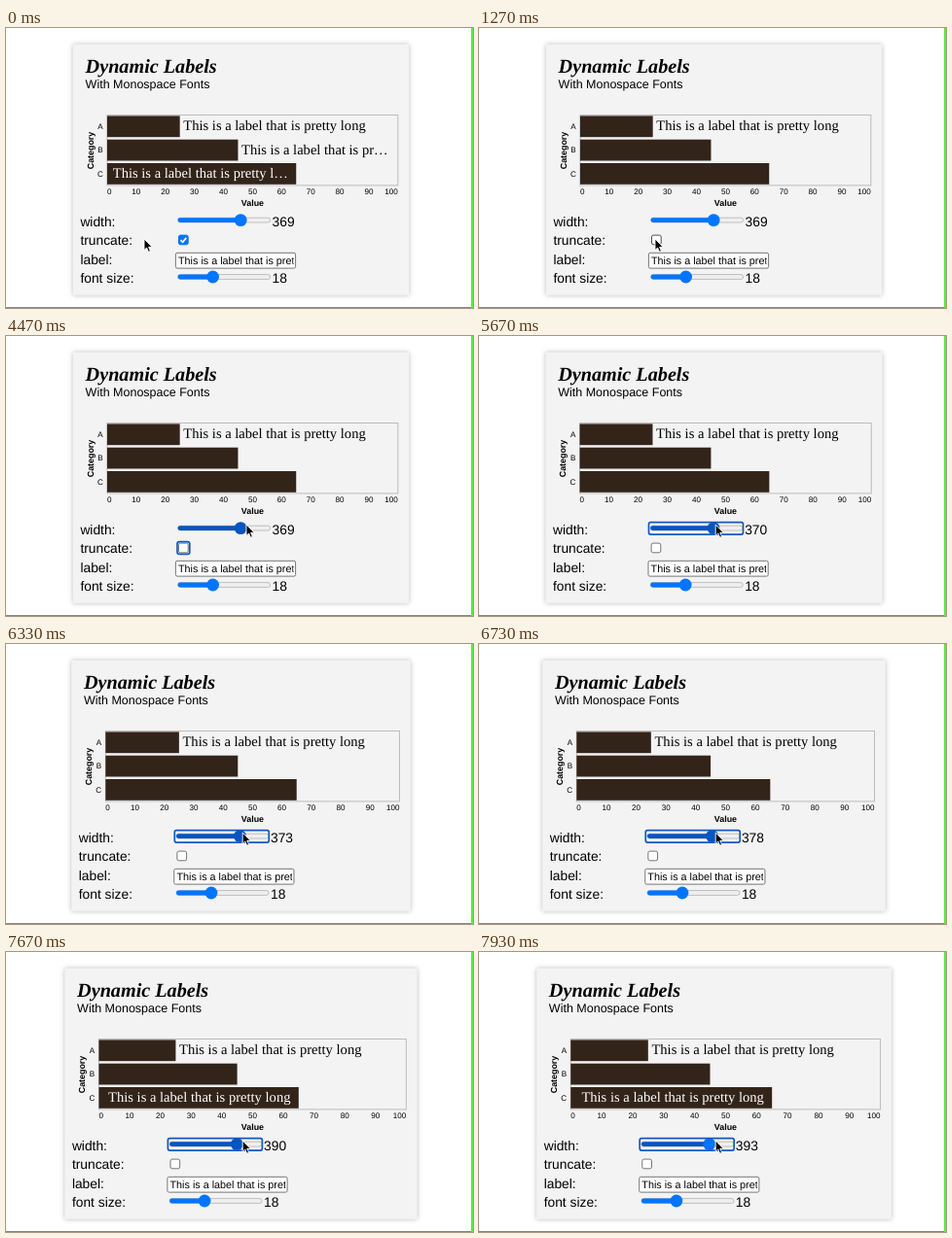
Write an HTML page that moves like this. It is 480 px wide and 288 px high and loops after 8000 ms.

```html
<!DOCTYPE html>
<html lang="en">
<head>
<meta charset="utf-8">
<title>Dynamic Labels</title>
<style>
  html, body { margin: 0; width: 100%; height: 100%; overflow: hidden; background: #fff; }
  svg { display: block; font-family: "Liberation Sans", Arial, sans-serif; text-rendering: geometricPrecision; }
  text { white-space: pre; }
  .serif { font-family: "Liberation Serif", Times, serif; }
  .title { font-size: 20.2px; font-weight: bold; font-style: italic; }
  .sub { font-size: 12.5px; }
  .form { font-size: 13.8px; }
  .tick { font-size: 8.1px; }
  .axis { font-size: 8.9px; font-weight: bold; text-anchor: middle; }
  .label { font-size: 14.58px; }
  .ring { fill: none; stroke: #1059c4; stroke-width: 1.7; }
  #card { fill: #f3f3f3; filter: drop-shadow(0 0 2.5px rgba(0, 0, 0, .27)); }
</style>
</head>
<body>
<svg id="stage" width="480" height="288" viewBox="0 0 480 288">
  <defs><clipPath id="field"><rect x="176" y="231" width="119.6" height="16"/></clipPath></defs>
  <rect id="card" y="16.8" height="258"/>
  <g id="left">
    <text class="serif title" x="81.6" y="46.4">Dynamic Labels</text>
    <text class="sub" x="81.6" y="62.4">With Monospace Fonts</text>
    <text class="axis" transform="translate(89.6 126) rotate(-90)">Category</text>
    <g class="form">
      <text x="76.4" y="204">width:</text>
      <text x="76.4" y="223.2">truncate:</text>
      <text x="76.4" y="243">label:</text>
      <text x="76.4" y="262">font size:</text>
      <text id="value" x="273.6" y="203.8">369</text>
      <text x="273.6" y="262">18</text>
    </g>
    <g id="sliders"></g>
    <rect id="sliderRing" class="ring" x="174.9" y="191.7" width="97" height="12.4" rx="2"/>
    <rect id="box" x="177.5" y="213.1" width="9.7" height="9.7" rx="1.8"/>
    <path id="check" d="M179.5 218.1l2.1 2.2 3.8-4.6" fill="none" stroke="#fff" stroke-width="1.7"/>
    <rect id="boxRing" class="ring" x="176" y="211.6" width="12.8" height="12.8" rx="2.2"/>
    <rect x="174.4" y="231.3" width="123.2" height="15.8" rx="1.6" fill="#fff" stroke="#767676"/>
    <text x="177" y="242.9" font-size="10.8" clip-path="url(#field)">This is a label that is pretty long</text>
  </g>
  <g id="chart"></g>
  <text class="axis" x="253.4" y="183">Value</text>
  <rect x="478" width="2" height="288" fill="#55ee3c"/>
  <rect y="287" width="478" height="1" fill="#848484"/>
  <path id="cursor" d="M0 0V11.4L2.6 9 4.4 13.2 6.4 12.4 4.6 8.3H8.2Z" stroke="#fff" stroke-width=".9"/>
</svg>
<script>
const LOOP = 8000, FPS = .015, SCALE = .81, MID = 253.4, CHAR = 7.2;
const LABEL = "This is a label that is pretty long";
const BLUE = "#0075ff", DARK = "#0555c0", PRESSED = "#3b93ff";
const $ = id => document.getElementById(id);

function set(node, attrs) {
  for (const k in attrs) node.setAttribute(k, attrs[k]);
  return node;
}
function add(parent, tag, attrs, text = "") {
  const node = document.createElementNS("http://www.w3.org/2000/svg", tag);
  node.textContent = text;
  parent.append(node);
  return set(node, attrs);
}

function slider(y) {
  const g = $("sliders"), track = { x: 176.6, y: y - 2.4, height: 4.8, rx: 2.4 };
  add(g, "rect", { ...track, width: 95, fill: "#efefef", stroke: "#b2b2b2", "stroke-width": .8 });
  const fill = add(g, "rect", track), thumb = add(g, "circle", { cy: y, r: 6.4 });
  return (x, fillColor, thumbColor) => {
    set(fill, { width: x - 176.6, fill: fillColor });
    set(thumb, { cx: x, fill: thumbColor });
  };
}
const drawWidth = slider(197.6), drawSize = slider(256);
drawSize(212.6, BLUE, BLUE);

const chart = $("chart");
const frame = add(chart, "rect", { y: 89.5, height: 72.4, fill: "none", stroke: "#bbb" });
const bars = [25, 45, 65].map((v, i) => {
  const y = 90.4 + i * 24.3;
  return {
    v,
    bar: add(chart, "rect", { y, height: 21.8, fill: "#33241a" }),
    name: add(chart, "text", { class: "tick", y: y + 13.6, "text-anchor": "end" }, "ABC"[i]),
    label: add(chart, "text", { class: "serif label", y: y + 14.9 })
  };
});
const ticks = Array.from({ length: 11 }, (_, i) => add(chart, "text", {
  class: "tick", y: 171, "text-anchor": i == 0 ? "start" : i == 10 ? "end" : "middle"
}, i * 10));

function drawChart(w, truncate) {
  const plot = w * SCALE, x0 = MID - plot / 2, at = v => x0 + plot * v / 100;
  set(frame, { x: x0, width: plot });
  ticks.forEach((t, i) => set(t, { x: at(i * 10) }));
  for (const { v, bar, name, label } of bars) {
    const inner = w * v / 100, outer = w - inner - 5, inside = inner > outer;
    const n = Math.floor(Math.max(inner, outer) / CHAR);
    label.textContent = n >= LABEL.length ? LABEL : truncate ? LABEL.slice(0, n - 1) + "…" : "";
    set(bar, { x: x0, width: plot * v / 100 });
    set(name, { x: x0 - 4.2 });
    set(label, {
      x: at(v) + (inside ? -8.3 : 3.6),
      fill: inside ? "#fff" : "#000",
      "text-anchor": inside ? "end" : "start"
    });
  }
}

// time, x, y of the pointer
const PATH = [
  [0, 142, 217], [600, 181, 217], [1870, 181, 217], [2400, 221.5, 194.5],
  [2730, 221.5, 194.5], [3070, 247, 194], [5000, 247, 194], [5130, 243.2, 194], [LOOP, 243.2, 194]
];
function pointer(t) {
  const i = Math.max(1, PATH.findIndex(p => p[0] >= t));
  const [t0, x0, y0] = PATH[i - 1], [t1, x1, y1] = PATH[i];
  const u = (t - t0) / (t1 - t0), e = u * u * (3 - 2 * u);
  return [x0 + (x1 - x0) * e, y0 + (y1 - y0) * e];
}

// One key press, then auto-repeat
function widthAt(t) {
  return t < 5670 ? 369 : t < 6130 ? 370 : 371 + Math.floor((t - 6130) / 81);
}

function render(t) {
  const w = widthAt(t), shift = (w - 369) * SCALE / 2, checked = t < 1270;
  const [x, y] = t < 60 ? [142, 217] : pointer(t);
  const cardWidth = 345.4 + shift * 2;
  set($("card"), { x: 241.5 - cardWidth / 2, width: cardWidth });
  set($("left"), { transform: `translate(${-shift} 0)` });
  set($("cursor"), { transform: `translate(${x} ${y})` });
  $("value").textContent = w;
  drawChart(w, checked);

  const thumb = 241.2 + (w - 369) * .22, local = x + shift;
  const overTrack = Math.abs(y - 197.6) < 7 && local > 176 && local < 272;
  const overThumb = overTrack && Math.abs(local - thumb) < 6.3;
  drawWidth(thumb, overTrack ? DARK : BLUE, overThumb ? DARK : BLUE);

  const overBox = x > 177 && x < 188 && y > 212 && y < 224;
  const blue = t >= 1130 ? PRESSED : overBox ? DARK : BLUE;
  set($("box"), {
    fill: checked ? blue : "#fff",
    stroke: checked ? blue : overBox ? "#4f4f4f" : "#767676"
  });
  $("check").style.display = checked ? "" : "none";
  $("boxRing").style.display = t >= 3270 && t < 5470 ? "" : "none";
  $("sliderRing").style.display = t >= 5470 ? "" : "none";
}

const start = performance.now();
function tick() {
  const t = Math.max(0, performance.now() - start) % LOOP;
  render(Math.min(LOOP, Math.floor((t + 4) * FPS) / FPS + 4));
  requestAnimationFrame(tick);
}
tick();
</script>
</body>
</html>
```
